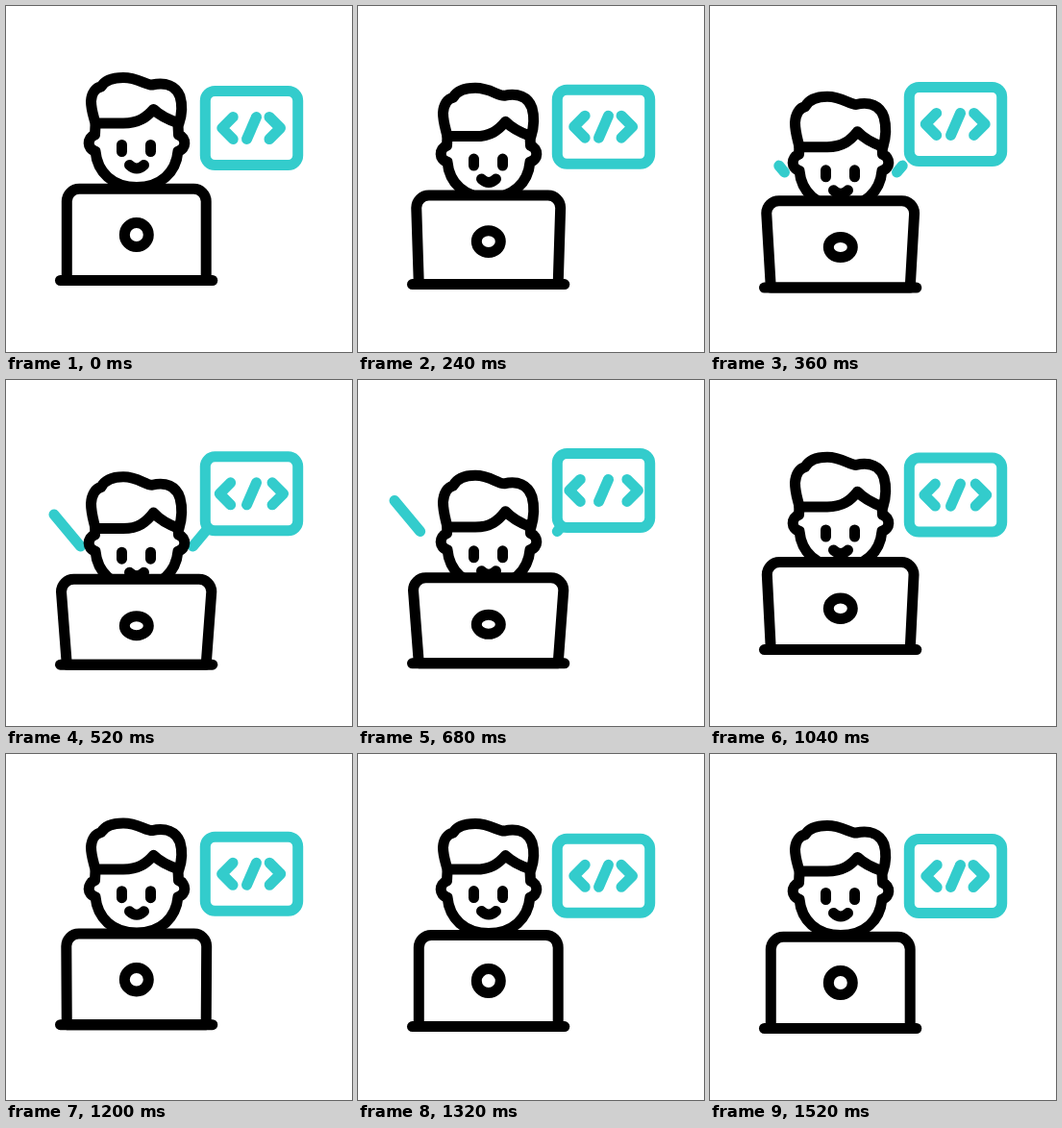
An HTML page for the animation above (1.84 s loop, 360 by 360 pixels).

```html
<!DOCTYPE html>
<html lang="en">
<head>
<meta charset="utf-8">
<title>Programmer at work</title>
<style>
  html, body { margin: 0; width: 100%; height: 100%; overflow: hidden; background: #fff; }
  svg { display: block; width: 100vw; height: 100vh; }
  path, ellipse, rect { fill: #fff; stroke: #000; stroke-width: 11; stroke-linecap: round; stroke-linejoin: round; }
  .teal, .teal * { stroke: #33cccc; }
  .line { fill: none; }
</style>
</head>
<body>
<svg viewBox="0 0 360 360">
  <path id="rays" class="teal line"/>
  <g id="bubble" class="teal">
    <rect x="207.3" y="88.5" width="96.4" height="77" rx="10"/>
    <path id="left" class="line" d="M236.2 115.5L224.8 127L236.2 138.5"/>
    <path class="line" d="M260.5 115.5L250.5 138.5"/>
    <path id="right" class="line" d="M274 115.5L285.5 127L274 138.5"/>
  </g>
  <path id="head" d="M93 124L92.5 134C84 137 84 149 93 151C95 173 111 188.5 136 188.5C161 188.5 177 173 179 151C188 149 188 137 179.5 134L179 124"/>
  <g id="face">
    <path class="line" d="M120.5 144.5V151.5M150.5 144.5V151.5"/>
    <path class="line" d="M128.5 165.5Q136 172.5 143.5 165.5"/>
  </g>
  <path id="hair"/>
  <path id="lid"/>
  <ellipse id="badge" cx="135.8" rx="12.5"/>
  <path id="base" class="line" d="M56.5 285.5H214.8"/>
</svg>
<script>
const LOOP = 1840, STEP = 40;

const hairShape = "M93 122C91 114 88.5 108 88.5 99C89 91 93 85 99 84C103 77 112 74.5 122 74.5" +
  "C137 74.5 145 82 152 82C166 79 177 83 181 94C184 104 183 113 180 122" +
  "C171 119 161 115 153.5 107.5C146 116 138 122 122 122Z";

const $ = id => document.getElementById(id);
const put = (id, name, value) => $(id).setAttribute(name, value);
const move = (id, x, y) => put(id, "transform", `translate(${x} ${y})`);
const ramp = (t, from, to) => Math.max(0, Math.min(1, (t - from) / (to - from)));
const ease = (t, from, to) => (1 - Math.cos(Math.PI * ramp(t, from, to))) / 2;
const warp = (path, fy) => path.replace(/([\d.]+) ([\d.]+)/g, (_, x, y) => `${x} ${fy(+y)}`);

function drawRays(t) {
  const tail = ramp(t, 580, 888), tip = ramp(t, 318, 608);
  const ray = side => {
    const at = p => `${136 - side * (58.5 + 39.5 * p)} ${173 - 47.5 * p}`;
    return `M${at(tail)}L${at(tip)}`;
  };
  put("rays", "d", ray(1) + ray(-1));
  put("rays", "visibility", tip > 0 && tail < 1 ? "visible" : "hidden");
}

function drawBubble(t) {
  const lift = ease(t, 100, 780) - ease(t, 780, 1360);
  const spread = 5.5 * lift * lift;
  move("bubble", 0, -12.7 * lift);
  move("left", -spread, 0);
  move("right", spread * 1.2, 0);
}

// The head rides on the bob and sinks with the lean; nearer parts sink further.
function drawHead(bob, lean) {
  const crown = bob + 15.5 * lean, fringe = bob + 21.8 * lean;
  move("head", 0, bob + 16.3 * lean);
  move("face", 0, bob + 24 * lean);
  put("hair", "d", warp(hairShape, y => y + crown + (fringe - crown) * (y - 74) / 48));
}

function drawLaptop(bob, lean) {
  const floor = 285.5 + bob, top = floor - 95.2 + 6.2 * lean;
  const l = 63.3 - 5.8 * lean, r = 208.2 + 5.6 * lean, c = 13;
  put("lid", "d", `M63.3 ${floor}L${l} ${top + c}A${c} ${c} 0 0 1 ${l + c} ${top}` +
    `H${r - c}A${c} ${c} 0 0 1 ${r} ${top + c}L208.2 ${floor}Z`);
  put("badge", "cy", floor - 47.5 + 7 * lean);
  put("badge", "ry", 12.5 - 2.5 * lean);
  move("base", 0, bob);
}

function draw(t) {
  const bob = 11 * ease(t, 0, 580) - 16 * ease(t, 580, 1050) + 5 * ease(t, 1050, 1520);
  const lean = ease(t, 0, 520) - ease(t, 900, 1270);
  drawRays(t);
  drawBubble(t);
  drawHead(bob, lean);
  drawLaptop(bob, lean);
}

function tick() {
  draw(Math.floor(performance.now() % LOOP / STEP) * STEP);
  requestAnimationFrame(tick);
}
tick();
</script>
</body>
</html>
```
